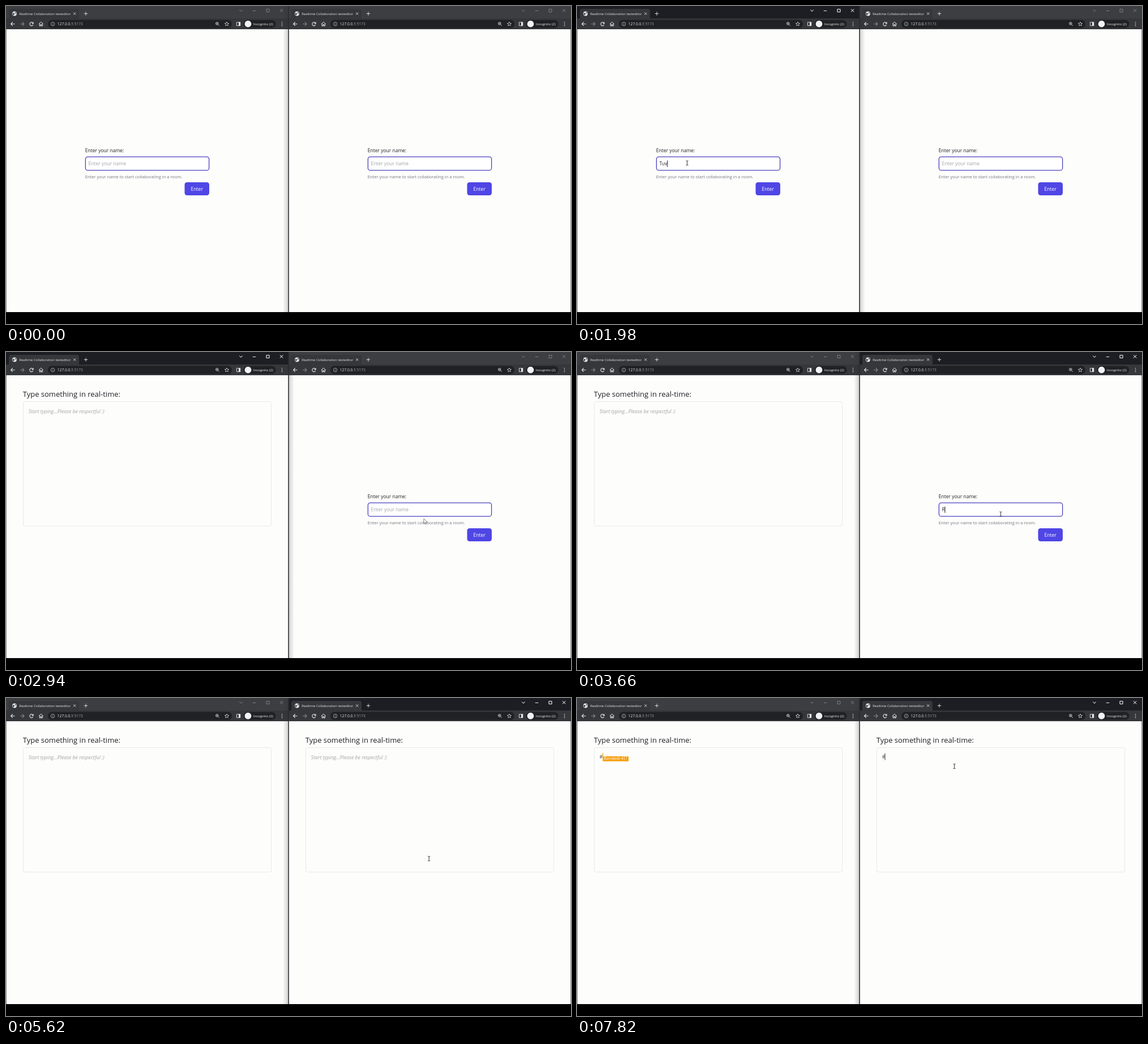
Animation, 998 px wide and 561 px high, one loop 8 s. Source, as an HTML page with a canvas:

```html
<!DOCTYPE html>
<html lang="en">
<head>
<meta charset="utf-8">
<title>Realtime editor demo</title>
<style>
html, body { margin: 0; width: 100%; height: 100%; overflow: hidden; background: #000; }
canvas { display: block; width: 100vw; height: 100vh; }
</style>
</head>
<body>
<canvas id="stage" width="998" height="561"></canvas>
<script>
const ctx = document.getElementById('stage').getContext('2d');
const LOOP = 8000, HALF = 499, BOTTOM = 540;
const SANS = '"Open Sans", "Noto Sans", sans-serif';
const SERIF = '"Liberation Serif", serif';
const PAGE = '#fdfdfc', INDIGO = '#4f46e5', ORANGE = '#f59e0b';

const clamp = v => Math.max(0, Math.min(1, v));
const ramp = (t, from, to) => clamp((t - from) / (to - from));
const ease = k => k * k * (3 - 2 * k);

const panes = [
  { x: 0, name: 'Tuv', keys: [1520, 1760, 1980], enter: 2240,
    focus: t => ramp(t, 840, 960) - ramp(t, 3200, 3340) },
  { x: HALF, name: 'Ravonesh', keys: [3660, 3840, 4040, 4180, 4360, 4420, 4500, 4560], enter: 4830,
    focus: t => ramp(t, 3200, 3340) }
];

// Pointer stops: time, x, y
const stops = [
  [260, 300, 552], [820, 194.5, 277], [2340, 194.5, 277], [2900, 738, 294],
  [2980, 738, 294], [3160, 748.5, 286], [5600, 748.5, 286], [5880, 666.5, 120.5]
];

function text(str, x, y, size, color, style = '', family = SANS) {
  ctx.font = `${style} ${size}px ${family}`;
  ctx.fillStyle = color;
  ctx.fillText(str, x, y);
  return x + ctx.measureText(str).width;
}

function rect(x, y, w, h, color) {
  ctx.fillStyle = color;
  ctx.fillRect(x, y, w, h);
}

function round(x, y, w, h, r, fill, stroke, width = 1) {
  ctx.beginPath();
  ctx.roundRect(x, y, w, h, r);
  paint(fill, stroke, width);
}

function circle(x, y, r, fill, stroke, width = 1) {
  ctx.beginPath();
  ctx.arc(x, y, r, 0, 7);
  paint(fill, stroke, width);
}

function paint(fill, stroke, width) {
  if (fill) { ctx.fillStyle = fill; ctx.fill(); }
  if (stroke) { ctx.strokeStyle = stroke; ctx.lineWidth = width; ctx.stroke(); }
}

function lines(d, color, width = 1) {
  ctx.strokeStyle = color;
  ctx.lineWidth = width;
  ctx.stroke(new Path2D(d));
}

function star(x, y, r) {
  ctx.beginPath();
  for (let i = 0; i < 10; i++) {
    const a = i * Math.PI / 5 - Math.PI / 2, q = i % 2 ? r * 0.45 : r;
    ctx.lineTo(x + q * Math.cos(a), y + q * Math.sin(a));
  }
  ctx.closePath();
  paint(null, '#dadce0', 0.8);
}

function controls(color) {
  lines('M412.3 6.8l2.7 2.6l2.7-2.6', color, 0.9);
  lines('M435.8 8.5h5.4', color, 0.9);
  lines('M460 5.6h5v5h-5z', color, 0.9);
  lines('M484 5.3l5.2 5.2m0-5.2l-5.2 5.2', color, 0.9);
}

function tabStrip(focus) {
  rect(0, 0, HALF, 23, '#3c3e41');
  ctx.globalAlpha = focus;
  rect(0, 0, HALF, 23, '#1d1e23');
  ctx.globalAlpha = 1;
  round(5, 5, 124, 22, 4, '#35373a');
  controls('#85888b');
  ctx.globalAlpha = focus;
  controls('#f4f5f6');
  ctx.globalAlpha = 1;

  circle(15, 13.5, 3.9, '#e8eaed');
  ctx.fillStyle = '#45474a';
  ctx.fill(new Path2D('M12 12.2l2.5.4l.8 1.6l-1.6 1.2l-.4 1.4l-1.6-2zM15.6 10.4l2.1 1l.4 2l-1.7-.3z'));
  text('Realtime Collaboration texteditor', 23.3, 15.8, 5.9, '#e4e6e9');
  lines('M119.2 11.5l4 4m0-4l-4 4', '#e4e6e9', 0.9);
  lines('M137.8 13.5h6.4m-3.2-3.2v6.4', '#e4e6e9', 0.9);
}

function toolbar() {
  const ink = '#e8eaed';
  rect(0, 22, HALF, 19, '#35373a');
  lines('M15.6 31.7h-7m3.2-3.2l-3.2 3.2l3.2 3.2', ink, 1.1);
  lines('M25 31.7h7m-3.2-3.2l3.2 3.2l-3.2 3.2', '#85888b', 1.1);
  ctx.beginPath();
  ctx.arc(45, 31.7, 3.1, 0.5, 5.5);
  paint(null, ink, 1.1);
  ctx.fillStyle = ink;
  ctx.fill(new Path2D('M48.7 27.9v3.6h-3.6z'));
  lines('M57.9 31.8l3.9-3.6l3.9 3.6M59.2 31v4.2h1.9v-2.6h1.4v2.6h1.9v-4.2', ink, 1);

  round(74, 24.5, 325, 14.5, 7.2, '#202124');
  circle(82.6, 31.7, 3.3, null, '#bdc1c6', 0.8);
  lines('M82.6 31.3v2.2M82.6 29.7v.9', '#bdc1c6', 0.8);
  const end = text('127.0.0.1', 90.8, 34.1, 6.65, '#e8eaed');
  text(':5173', end, 34.1, 6.65, '#9aa0a6');
  circle(372.8, 30.9, 2.3, null, '#dadce0', 0.9);
  lines('M374.5 32.6l2.4 2.4M371.7 30.9h2.2m-1.1-1.1v2.2', '#dadce0', 0.8);
  star(390, 31.8, 3.8);

  lines('M407.4 28.7h6.3v6h-6.3z', ink, 0.9);
  rect(411, 28.5, 3, 6.4, ink);
  round(419.5, 24.8, 57, 13.8, 6.9, '#202124');
  circle(427.5, 31.7, 5.9, '#f1f3f4');
  text('Incognito (2)', 436.8, 33.8, 6.07, '#f1f3f4');
  for (const y of [28.8, 31.7, 34.6]) circle(487.5, y, 0.8, ink);
}

function form(pane, t) {
  text('Enter your name:', 139.8, 257.5, 8.5, '#1f2023');
  round(140.4, 266.1, 218.2, 23.8, 4, '#fff', '#4a41bb', 1.3);
  const typed = pane.name.slice(0, pane.keys.filter(k => t >= k).length);
  let end = 145.4;
  if (typed) end = text(typed, end, 281.4, 8.55, '#27282b');
  else text('Enter your name', end, 281.4, 8.55, '#a0a3a9');
  if (pane.focus(t) > 0.5) rect(end - 0.2, 272.5, 1, 11.5, '#2a2a2e');
  text('Enter your name to start collaborating in a room.', 139.8, 303.9, 7.55, '#74777e');
  round(315.5, 311, 43.5, 23, 4.2, INDIGO);
  text('Enter', 326.5, 326.1, 8.6, '#fff');
}

function remoteCaret(x, top, y) {
  rect(x - 0.5, top, 1.2, y - top + 1, ORANGE);
  rect(x, y, 45.5, 8.8, ORANGE);
  text('Ravonesh-417', x + 1.8, y + 6.6, 7.2, '#fff', '', SERIF);
}

function editor(pane, t) {
  text('Type something in real-time:', 29.7, 79, 13, '#1f2023');
  round(30.5, 87.5, 438, 219.5, 3, null, '#e8e9ee');
  const local = pane.x > 0;
  const filled = t >= (local ? 7780 : 7820);
  if (filled) text('#', 39.8, 107.4, 8.5, '#4b4c50');
  else text('Start typing...Please be respectful :)', 39.8, 107.6, 8.75, '#a4a5a6', 'italic');

  if (!local) {
    if (filled) remoteCaret(45.5, 97, 102.8);
    else if (t >= 6080) remoteCaret(40, 107, 112);
  } else if (t >= 6040 && (t < 6680 || t >= 7200)) {
    rect(filled ? 44.5 : 39, 97.5, 1, 12, '#333438');
  }
}

function drawPane(pane, t) {
  ctx.save();
  ctx.translate(pane.x, 0);
  rect(0, 0, HALF, BOTTOM, PAGE);
  tabStrip(pane.focus(t));
  toolbar();
  (t < pane.enter ? form : editor)(pane, t);
  ctx.restore();
}

function shadow(x, dir, alpha) {
  const g = ctx.createLinearGradient(x, 0, x + dir * 9, 0);
  g.addColorStop(0, `rgba(40,42,50,${0.2 * alpha})`);
  g.addColorStop(1, 'rgba(40,42,50,0)');
  rect(Math.min(x, x + dir * 9), 0, 9, BOTTOM, g);
}

function pointerAt(t) {
  if (t < stops[0][0]) return null;
  const i = stops.findIndex(s => s[0] > t);
  if (i < 0) return stops[stops.length - 1].slice(1);
  const [t0, x0, y0] = stops[i - 1], [t1, x1, y1] = stops[i];
  const k = ease(ramp(t, t0, t1));
  return [x0 + (x1 - x0) * k, y0 + (y1 - y0) * k];
}

function overText(x, y, t) {
  const pane = panes[x < HALF ? 0 : 1], u = x - pane.x;
  return t < pane.enter
    ? u > 140 && u < 359 && y > 266 && y < 290
    : u > 30 && u < 469 && y > 87 && y < 307;
}

function pointer(t) {
  const p = pointerAt(t);
  if (!p) return;
  ctx.save();
  ctx.translate(...p);
  if (overText(...p, t)) {
    lines('M-2-4h1.5l.5.5l.5-.5h1.5M0-3.5v7M-2 4h1.5l.5-.5l.5.5h1.5', '#222', 0.9);
  } else {
    const arrow = new Path2D('M0 0v8.6l2-1.9l1.3 3l1.4-.6l-1.3-2.9h2.8z');
    ctx.fillStyle = '#fff';
    ctx.fill(arrow);
    ctx.strokeStyle = '#55565a';
    ctx.lineWidth = 0.7;
    ctx.stroke(arrow);
  }
  ctx.restore();
}

function frame(now) {
  const t = now % LOOP;
  for (const pane of panes) drawPane(pane, t);
  const left = panes[0].focus(t);
  shadow(HALF + 1, 1, left);
  shadow(HALF - 1, -1, 1 - left);
  rect(498.3, 0, 1.6, BOTTOM, '#2b2c30');
  rect(0, 41, 0.7, BOTTOM - 41, '#55565a');
  rect(997.3, 41, 0.7, BOTTOM - 41, '#55565a');
  pointer(t);
  rect(0, BOTTOM, 998, 21, '#000');
}

const start = performance.now();
function tick() {
  frame(performance.now() - start);
  requestAnimationFrame(tick);
}
tick();
</script>
</body>
</html>
```
